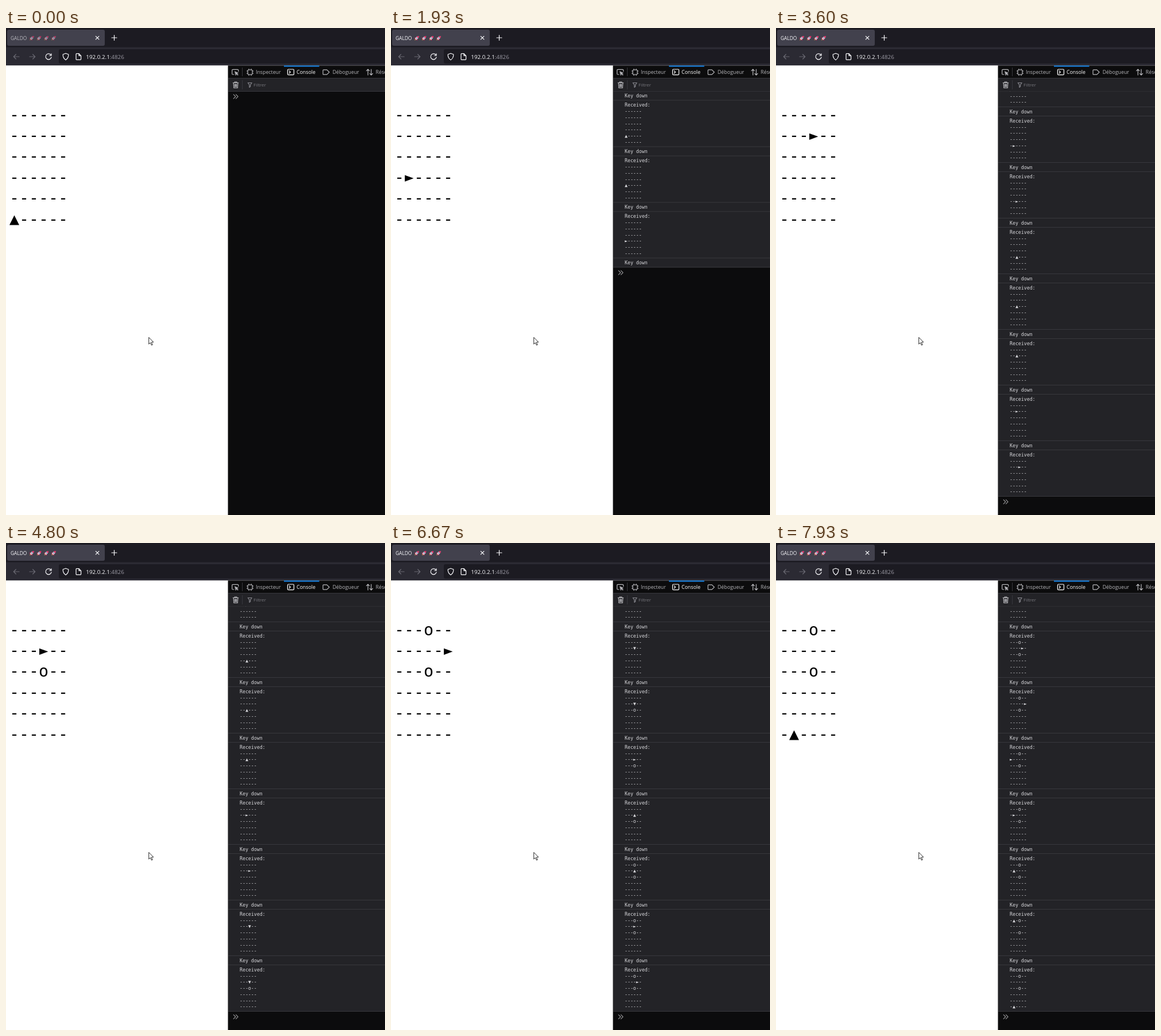
Write an HTML page that moves like this. It is 660 by 849 pixels and loops after 8 s.

```html
<!DOCTYPE html>
<html lang="fr">
<head>
<meta charset="utf-8">
<title>Console</title>
<style>
html, body { margin: 0; width: 100%; height: 100%; overflow: hidden; background: #fff; }
svg { display: block; width: 660px; height: 849px; }
text { white-space: pre; }
.ui { font-family: "Open Sans", "Noto Sans", sans-serif; font-size: 8.8px; fill: #b8b8bc; }
.mono { font-family: "DejaVu Sans Mono", monospace; }
.line { fill: none; stroke-linecap: round; stroke-linejoin: round; stroke-width: 1.2; }
#board { font-size: 28.24px; }
#log { font-size: 8.22px; fill: #d7d7db; }
</style>
</head>
<body>
<svg viewBox="0 0 660 849">
  <defs>
    <g id="rocket" transform="rotate(45)">
      <path d="M-2 0-4 3.2-1.5 2.6zM2 0 4 3.2 1.5 2.6z" fill="#e0245e"/>
      <path d="M-1.2 3h2.4L0 6z" fill="#f8a13a"/>
      <path d="M0-6C2.6-3.5 2.6 0 1.6 3.2h-3.2C-2.6 0-2.6-3.5 0-6z" fill="#e6dfe6"/>
      <path d="M0-6C1.3-4.8 2-3.6 2.1-2.3h-4.2C-2-3.6-1.3-4.8 0-6z" fill="#e0245e"/>
      <circle r="1" cy="-.6" fill="#4a6fa0"/>
      <path d="M0 1.2V4" stroke="#e0245e" stroke-width="1"/>
    </g>
    <clipPath id="view"><path d="M387 110.5h273V849H387z"/></clipPath>
  </defs>

  <!-- browser frame -->
  <rect width="660" height="34" fill="#1c1b22"/>
  <rect y="33.5" width="660" height="32" fill="#2b2a33"/>
  <path d="M660 37H95a3 3 0 0 0-3 3v19a3 3 0 0 0 3 3h565z" fill="#1c1b22"/>
  <rect x="2" y="3" width="170" height="28" rx="3" fill="#42414d"/>
  <g id="title">
    <text class="ui" x="8" y="21" style="font-size:8.4px;fill:#fbfbfe">GALDO</text>
  </g>
  <g class="line" stroke="#fbfbfe">
    <path d="M156.3 14.3l5.6 5.6m0-5.6l-5.6 5.6M184 17h9m-4.5-4.5v9"/>
    <path d="M78.3 47.2a5 5 0 1 0 .7 3.6M78.9 44.8v3.2h-3.2"/>
    <path d="M104 44.2l4.8 1.8c.2 4.5-1.4 7.6-4.8 9.7-3.4-2.1-5-5.2-4.8-9.7z"/>
    <path d="M122 45.7a1 1 0 0 1 1-1h4l3.6 3.6v6a1 1 0 0 1-1 1H123a1 1 0 0 1-1-1zM127 44.9v3.4h3.4"/>
  </g>
  <path class="line" stroke="#6a6973" d="M23 50H13.3m4-4-4 4 4 4M41 50h9.7m-4-4 4 4-4 4"/>
  <text class="ui" x="139.3" y="54" style="font-size:9.8px;fill:#fbfbfe">192.0.2.1<tspan fill="#9a99a3">:4826</tspan></text>

  <!-- page -->
  <rect y="65.5" width="387" height="783.5" fill="#fff"/>
  <g id="board" class="mono"></g>
  <polygon id="marker"/>
  <path d="M248.7 539.3v11.8l2.7-2.4 2 4.3 1.8-.8-2-4.2 3.6-.4z" fill="#fff" stroke="#111" stroke-width=".9"/>

  <!-- developer tools -->
  <rect x="386.5" y="65.5" width="274" height="784" fill="#0c0c0d"/>
  <rect x="387" y="88" width="273" height="22" fill="#232327"/>
  <path d="M387 87.5h273M387 110.5h273M411.5 69v15M411.5 91v16" stroke="#38383d"/>
  <rect x="484" y="65.5" width="61.5" height="2" fill="#1583e8"/>
  <g class="line" stroke="#b8b8bc">
    <path d="M397 81h-2a1.3 1.3 0 0 1-1.3-1.3v-6a1.3 1.3 0 0 1 1.3-1.3h8.4a1.3 1.3 0 0 1 1.3 1.3v2"/>
    <path d="M398.6 75.8l6 2.6-2.5.9 2.3 2.3-.8.8-2.4-2.3-.9 2.3z" fill="#b8b8bc" stroke-width=".6"/>
    <rect x="421" y="73" width="8" height="8" rx="1.3"/>
    <path d="M423 71.3v1.4m4-1.4v1.4M423 81.3v1.4m4-1.4v1.4M419.3 75h1.4m-1.4 4h1.4M429.3 75h1.4m-1.4 4h1.4"/>
    <path d="M553 72.8h5.8l4.2 4.2-4.2 4.2H553a1 1 0 0 1-1-1v-6.4a1 1 0 0 1 1-1z"/>
    <path d="M630.3 82v-10m-2.6 2.7 2.6-2.7 2.6 2.7M636 72v10m-2.6-2.7L636 82l2.6-2.7"/>
    <path d="M395.3 95.5h9.4M398 95.3v-1.2h4v1.2M396.2 96l.6 8.5h6.4l.6-8.5M398.5 97.8v4.8m1.5-4.8v4.8m1.5-4.8v4.8"/>
  </g>
  <g class="line" stroke="#fff">
    <rect x="490.4" y="72" width="11" height="9.6" rx="1.4"/>
    <path d="M493 74.6l2.3 2.2-2.3 2.2"/>
  </g>
  <path class="line" stroke="#85858b" d="M421.2 95.5h7l-2.6 3.6v3l-1.8 1.3v-4.3z"/>
  <g class="ui">
    <text x="435" y="80.2">Inspecteur</text>
    <text x="506" y="80.2" fill="#fff">Console</text>
    <text x="568.7" y="80.2">Débogueur</text>
    <text x="643.8" y="80.2">Réseau</text>
    <text x="431" y="102.2" style="font-size:8px;fill:#76767c">Filtrer</text>
  </g>
  <g clip-path="url(#view)">
    <g id="log" class="mono">
      <rect id="logBack" x="387" width="273" fill="#232327"/>
    </g>
    <path id="prompt" class="line" stroke="#939395" d="M396.2-3.6l3.6 3.6-3.6 3.6M400.4-3.6l3.6 3.6-3.6 3.6"/>
  </g>
</svg>

<script>
const LOOP = 8000, SIZE = 6;
const TOP = 110.5, BOTTOM = 817, KEY_H = 16, ENTRY_H = 97;
const byId = id => document.getElementById(id);

// f: forward, l / r: turn
const COMMANDS = "ffrfflffrfrfllfrfffflff";
// per command: board update, "Key down" line, "Received" block
const TIMES = [
  [930, 1000, 1070], [1070, 1130, 1200], [1530, 1600, 1730], [1800, 1870, 2000],
  [2000, 2070, 2130], [2530, 2600, 2670], [2600, 2670, 2800], [2800, 2870, 3000],
  [3130, 3200, 3330], [3470, 3600, 3600], [3930, 4000, 4130], [4330, 4400, 4530],
  [4800, 4870, 5000], [5330, 5470, 5530], [5730, 5800, 5800], [6130, 6200, 6330],
  [6470, 6530, 6600], [6670, 6730, 6800], [6800, 6870, 6930], [7130, 7200, 7330],
  [7400, 7470, 7530], [7600, 7670, 7800], [7800, 7870, 7930]
];
const ROCKS = ["2,3", "0,3"];
const STEPS = [[-1, 0], [0, 1], [1, 0], [0, -1]];
const GLYPHS = "▲►▼◄";
const SHAPES = [
  "0,8.7 8.5,-8.4 17,8.7",
  "1,-5.6 16.4,0 1,5.6",
  "0,-8.4 8.5,8.7 17,-8.4",
  "16,-5.6 .6,0 16,5.6"
];

function simulate() {
  let row = 5, col = 0, dir = 0, found = [];
  const states = [{ row, col, dir, found }];
  for (const c of COMMANDS) {
    if (c === "f") {
      const r = (row + STEPS[dir][0] + SIZE) % SIZE;
      const k = (col + STEPS[dir][1] + SIZE) % SIZE;
      const cell = r + "," + k;
      if (ROCKS.includes(cell)) found = [...found, cell];
      else [row, col] = [r, k];
    } else {
      dir = (dir + (c === "r" ? 1 : 3)) % 4;
    }
    states.push({ row, col, dir, found });
  }
  return states;
}

function rowText(s, row, glyph) {
  let out = "";
  for (let col = 0; col < SIZE; col++) {
    const here = s.row === row && s.col === col;
    out += here ? glyph : s.found.includes(row + "," + col) ? "o" : "-";
  }
  return out;
}

function add(parent, tag, attrs, text = "") {
  const el = document.createElementNS("http://www.w3.org/2000/svg", tag);
  for (const name in attrs) el.setAttribute(name, attrs[name]);
  el.textContent = text;
  parent.append(el);
  return el;
}

const states = simulate();
const rowY = row => 153 + row * 36.36;
const rows = Array.from({ length: SIZE }, (_, i) =>
  add(byId("board"), "text", { x: 6, y: rowY(i) + 7.7 }));

for (let i = 0; i < 4; i++)
  add(byId("title"), "use", {
    href: "#rocket",
    transform: `translate(${44.8 + i * 12.7} 17.8) scale(.88)`
  });

const log = byId("log");
const entries = states.slice(1).map((s, i) => {
  const y = i * ENTRY_H;
  const key = add(log, "g", {}), received = add(log, "g", {});
  const write = (g, dy, text) => add(g, "text", { x: 407, y: y + dy }, text);
  const rule = (g, dy) => add(g, "path", { d: `M387 ${y + dy}h273`, stroke: "#38383d" });
  write(key, 10.6, "Key down");
  rule(key, KEY_H - 0.5);
  write(received, 26.5, "Received:");
  for (let r = 0; r < SIZE; r++)
    write(received, 37.7 + r * 10.72, rowText(s, r, GLYPHS[s.dir]));
  rule(received, ENTRY_H - 0.5);
  return { key, received };
});

function showBoard(s) {
  rows.forEach((el, i) => el.textContent = rowText(s, i, "\u00a0"));
  const marker = byId("marker");
  marker.setAttribute("points", SHAPES[s.dir]);
  marker.setAttribute("transform", `translate(${6 + s.col * 17} ${rowY(s.row)})`);
}

function showLog(keys, blocks) {
  const height = keys * KEY_H + blocks * (ENTRY_H - KEY_H);
  const top = Math.min(TOP, BOTTOM - height);
  entries.forEach((e, i) => {
    e.key.style.display = i < keys ? "" : "none";
    e.received.style.display = i < blocks ? "" : "none";
  });
  byId("logBack").setAttribute("height", height);
  log.setAttribute("transform", `translate(0 ${top})`);
  byId("prompt").setAttribute("transform", `translate(0 ${top + height + 9})`);
}

let shown = "";
function frame() {
  const t = performance.now() % LOOP;
  const [moves, keys, blocks] = [0, 1, 2].map(k => TIMES.filter(row => row[k] <= t).length);
  const dim = t < 130;
  const state = [moves, keys, blocks, dim].join();
  if (state !== shown) {
    shown = state;
    byId("title").style.opacity = dim ? 0.65 : 1;
    showBoard(states[moves]);
    showLog(keys, blocks);
  }
  requestAnimationFrame(frame);
}
frame();
</script>
</body>
</html>
```
